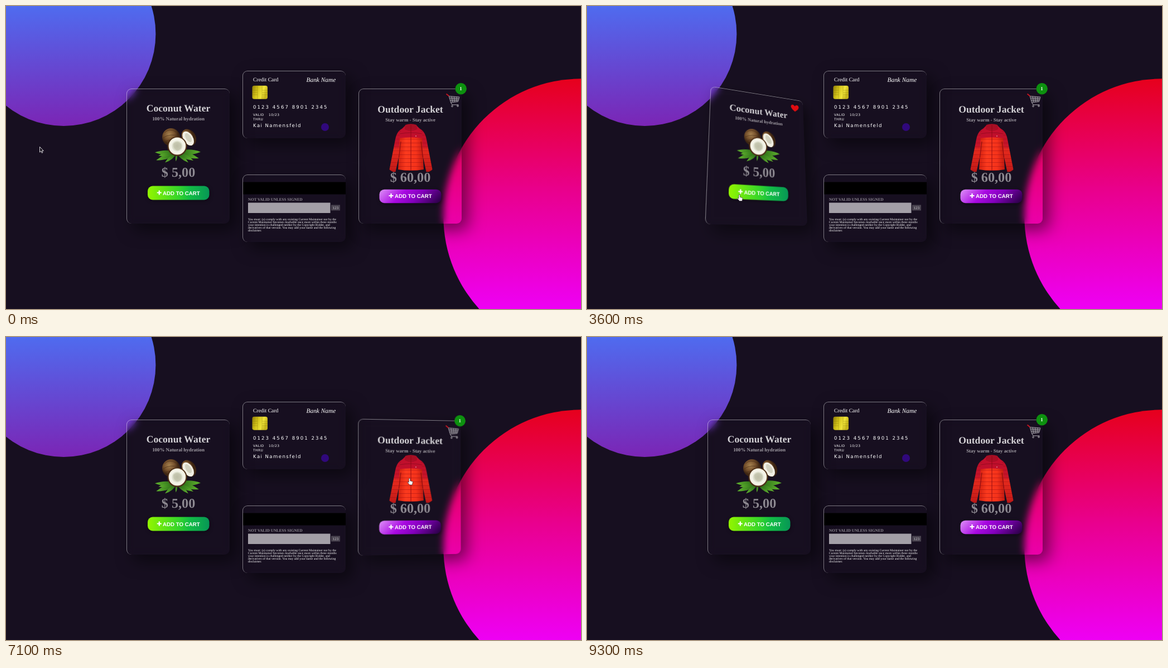
Recreate the animation shown at these times as an HTML page. Size 1031 px wide and 543 px high, loop 9.8 s.

```html
<!DOCTYPE html>
<html lang="en">
<head>
<meta charset="utf-8">
<title>Tilting shop cards</title>
<style>
  html, body { margin: 0; width: 100%; height: 100%; overflow: hidden; background: #170f20; }
  #stage { position: relative; width: 1031px; height: 543px; overflow: hidden; background: #170f20; }
  .disc { position: absolute; inset: 0; }
  .blue { clip-path: circle(165px at 103.4px 50px); background: linear-gradient(#4f6bef, #7b25b5 215px); }
  .pink { clip-path: circle(246.7px at 1031px 377px); background: linear-gradient(#e6001c 130px, #e9008f 335px, #ee00f4 543px); }
  .card {
    position: absolute; box-sizing: border-box; width: 185px; border-radius: 9px;
    border: 0 solid rgba(255, 255, 255, .44); border-width: 1px 0 0 1px;
    box-shadow: 11.5px 11.5px 29px rgba(0, 0, 0, .5); backdrop-filter: blur(6.5px);
  }
  .tall { top: 148px; height: 242px; }
  .flat { left: 424px; height: 121px; }
  .card svg { position: absolute; left: -1px; top: -1px; width: 185px; height: 100%; overflow: visible; }
  .tall svg { top: 0; }
  text { font-family: "Liberation Serif", "Times New Roman", serif; text-rendering: geometricPrecision; fill: #fff; }
  .mid { text-anchor: middle; }
  .title { font-size: 17.6px; font-weight: 700; fill: #d3d1d5; }
  .sub { font-size: 8.9px; font-weight: 700; fill: #a29ea5; }
  .price { font-size: 24.2px; font-weight: 700; fill: #8c8890; }
  .buy { font: 700 9.7px "Liberation Sans", Arial, sans-serif; }
  .btn { filter: drop-shadow(1px 2px 3px rgba(0, 0, 0, .4)); }
  .tech { font-family: "DejaVu Sans", sans-serif; font-size: 8.6px; letter-spacing: 1.4px; }
  .number { letter-spacing: 2.05px; }
  .label { font-size: 5.9px; letter-spacing: .5px; }
  .tiny { font-size: 5.64px; }
  #cursor { position: absolute; left: 0; top: 0; width: 20px; height: 20px; overflow: visible; }
</style>
</head>
<body>
<div id="stage">
  <div class="disc blue"></div>
  <div class="disc pink"></div>

  <div class="card tall" style="left:216px">
    <svg>
      <defs>
        <linearGradient id="lime"><stop stop-color="#93f600"/><stop offset=".5" stop-color="#35d52a"/><stop offset=".68" stop-color="#12bd45"/><stop offset="1" stop-color="#079756"/></linearGradient>
        <radialGradient id="husk" cx=".4" cy=".35"><stop stop-color="#a5814f"/><stop offset=".6" stop-color="#76512c"/><stop offset="1" stop-color="#3d2512"/></radialGradient>
        <radialGradient id="flesh"><stop stop-color="#bfc0aa"/><stop offset=".5" stop-color="#d6d8c4"/><stop offset=".72" stop-color="#f6f6ec"/><stop offset="1" stop-color="#f0ecdc"/></radialGradient>
        <linearGradient id="green"><stop stop-color="#1d5a12"/><stop offset="1" stop-color="#62b52f"/></linearGradient>
        <path id="leaf" d="M0 0Q17-9 39 0Q17 8 0 0" fill="url(#green)"/>
      </defs>
      <text class="title mid" x="93" y="40">Coconut Water</text>
      <text class="sub mid" x="93" y="56">100% Natural hydration</text>
      <g id="leaves"></g>
      <circle cx="80" cy="86" r="16" fill="url(#husk)"/>
      <path d="M68 78Q77 69 89 77M66 87Q78 79 94 84M69 94Q79 88 92 93" fill="none" stroke="#4b2f17" stroke-width=".7"/>
      <g transform="rotate(-32 111 87)">
        <ellipse cx="112" cy="87" rx="12" ry="16" fill="url(#husk)"/>
        <ellipse cx="110" cy="88" rx="8.5" ry="14" fill="#f1efe4"/>
        <ellipse cx="111" cy="87" rx="4.5" ry="9" fill="#d3d2c0"/>
      </g>
      <circle cx="91" cy="102.5" r="17.6" fill="#4c2e16"/>
      <circle cx="91" cy="102" r="15.4" fill="url(#flesh)"/>
      <path d="M84 98Q91 91 98 98Q101 107 92 110Q84 108 84 98" fill="#b9b9a2" opacity=".5"/>
      <text class="price mid" x="93" y="157">$ 5,00</text>
      <rect class="btn" x="38" y="173.5" width="110.5" height="25" rx="9" fill="url(#lime)"/>
      <path d="M58.8 181.5V189.5M54.8 185.5H62.8" stroke="#fff" stroke-width="2.2"/>
      <text class="buy" x="65" y="189.5">ADD TO CART</text>
      <path id="heart" d="M167 24Q155 16 160 11Q164 8.5 167 13Q170 8.5 174 11Q179 16 167 24Z" fill="#e00c10"/>
    </svg>
  </div>

  <div class="card flat" style="top:116px">
    <svg>
      <defs><linearGradient id="gold" x2="1" y2=".3"><stop stop-color="#8f7c08"/><stop offset=".4" stop-color="#d3c31a"/><stop offset=".75" stop-color="#efe43a"/><stop offset="1" stop-color="#c4b31a"/></linearGradient></defs>
      <text x="19" y="18.5" font-size="9.7">Credit Card</text>
      <text x="114.5" y="20" font-size="11.4" font-style="italic">Bank Name</text>
      <rect x="17.5" y="26.7" width="27.5" height="24" rx="3.5" fill="url(#gold)"/>
      <path d="M18 35H27V43H18M45 35H35V43H45M27 35V27.5M35 35V27.5M27 43V50.5M35 43V50.5M18 39H27M35 39H45" fill="none" stroke="#7d6c06" stroke-width=".6" opacity=".55"/>
      <text class="tech number" x="19" y="67.7">0123 4567 8901 2345</text>
      <text class="tech label" x="19" y="81.2">VALID</text>
      <text class="tech label" x="19" y="88.7">THRU</text>
      <text class="tech label" x="47" y="81.2">10/23</text>
      <text class="tech" x="19" y="100.7">Kai Namensfeld</text>
      <circle cx="148" cy="101" r="7" fill="#30087c"/>
    </svg>
  </div>

  <div class="card flat" style="top:301.5px">
    <svg>
      <rect x="1" y="13.5" width="184" height="22" fill="#000"/>
      <text x="10" y="47" font-size="7.14" font-weight="700" style="fill:#8f8b93">NOT VALID UNLESS SIGNED</text>
      <rect x="10" y="50.5" width="147.5" height="18.5" fill="#a39fa7"/>
      <rect x="159" y="54.5" width="16" height="10" fill="#49434f"/>
      <text class="mid" x="167" y="61.9" font-size="6.6" style="fill:#d6d4d8">123</text>
      <g id="terms"></g>
    </svg>
  </div>

  <div class="card tall" style="left:632px">
    <svg>
      <defs>
        <linearGradient id="violet" gradientUnits="userSpaceOnUse" x1="59" y1="158" x2="127" y2="226"><stop stop-color="#df94f9"/><stop offset=".36" stop-color="#a909e2"/><stop offset=".6" stop-color="#8400bd"/><stop offset="1" stop-color="#22003a"/></linearGradient>
        <linearGradient id="shell"><stop stop-color="#d3200f"/><stop offset=".3" stop-color="#fb3a1e"/><stop offset=".7" stop-color="#f5331b"/><stop offset="1" stop-color="#c01a10"/></linearGradient>
        <linearGradient id="arm" x2="0" y2="1"><stop stop-color="#b70e2a"/><stop offset=".4" stop-color="#c8142a"/><stop offset=".5" stop-color="#e52a1d"/><stop offset="1" stop-color="#c01a18"/></linearGradient>
        <pattern id="quilt" width="8" height="7" patternUnits="userSpaceOnUse"><path d="M0 5.5H8" stroke="#8c0712" stroke-width=".8" opacity=".5"/></pattern>
        <path id="cuff" d="M80 70Q69 74 66 90L55.5 144Q60 149 66.5 148L73 118L76 96Z"/>
        <path id="torso" d="M80 70H108L114 80L115 110L117 144Q94 148 71 144L73 110L74 80Z"/>
        <g id="sleeve"><use href="#cuff" fill="url(#arm)"/><use href="#cuff" fill="url(#quilt)"/></g>
      </defs>
      <text class="title mid" x="93" y="41.5">Outdoor Jacket</text>
      <text class="sub mid" x="93" y="58">Stay warm - Stay active</text>
      <use href="#sleeve"/>
      <use href="#sleeve" transform="translate(188 0) scale(-1 1)"/>
      <use href="#torso" fill="url(#shell)"/>
      <use href="#torso" fill="url(#quilt)"/>
      <path d="M84 65Q94 61 104 65L109 70Q114 74 114.5 88Q94 85 73.5 88Q74 74 79 70Z" fill="#c00f2c"/>
      <path d="M74 80Q94 76 114 80M83 71Q94 77 105 71" fill="none" stroke="#86091d" stroke-width=".7"/>
      <path d="M84 64Q94 60.5 104 64L105 70Q94 75 83 70Z" fill="#a70e24"/>
      <path d="M94 64V146" stroke="#8d0a14" stroke-width=".9"/>
      <path d="M76 94L72.5 122M112 94L115.500 122" stroke="#7d0812" stroke-width=".9"/>
      <circle cx="103" cy="84" r=".8" fill="#f6d9d9"/>
      <text class="price mid" x="93" y="166">$ 60,00</text>
      <rect class="btn" x="37.5" y="179.7" width="111" height="24.5" rx="9" fill="url(#violet)"/>
      <path d="M58.5 187V195M54.5 191H62.5" stroke="#fff" stroke-width="2.2"/>
      <text class="buy" x="65" y="195">ADD TO CART</text>
      <g fill="none" stroke="#b0adb4">
        <path d="M162 12.5L181 14L178.5 22.5L165.5 24ZM163 16L180.5 17.2M164 20L179.5 20M167 13L169 23.5M171.5 13.3L172.5 23M176 13.7V22.5" stroke-width=".8" fill="#8a878e55"/>
        <path d="M165.5 24L168 28H179.5"/>
        <circle cx="168" cy="30.5" r="1.3"/><circle cx="178" cy="30" r="1.3"/>
        <path d="M157.5 8.5L162.5 12.5" stroke="#d11420" stroke-width="1.7"/>
      </g>
      <circle cx="183.7" cy="-.7" r="10.2" fill="#0d900f"/>
      <text class="mid" x="183.5" y="2.3" font-size="8.8" font-weight="700">1</text>
    </svg>
  </div>

  <svg id="cursor">
    <path id="arrow" d="M.5 .3V10L2.8 8L4.3 11.3L5.9 10.6L4.4 7.4H7.3Z" fill="#15101a" stroke="#e8e6ea" stroke-width=".9"/>
    <path id="hand" d="M-1 1.2Q-1 0 .2 0T1.4 1.2V4.5L5.2 5.5Q6.3 5.9 6 7.2L5.1 11.6H.4L-3 7.6Q-3.7 6.2-2.4 6.1L-1 7.3Z" fill="#fff" stroke="#1c1622" stroke-width=".6"/>
  </svg>
</div>

<script>
const LOOP = 9800, STEP = 100, LAG = 100, FADE = 400, MAX_TILT = 25;
const $ = id => document.getElementById(id);
const clamp = (v, lo, hi) => Math.min(hi, Math.max(lo, v));
const easeOut = p => 1 - (1 - clamp(p, 0, 1)) ** 4;

// Pointer path: time, x, y
const path = [
  [0, 60, 252], [200, 60, 252], [700, 173, 321], [900, 222, 300], [1300, 285, 262],
  [1700, 245, 215], [2000, 246, 160], [2100, 268, 151], [2200, 307, 166], [2500, 355, 215],
  [2800, 270, 285], [3100, 203, 322], [3400, 217, 338], [3500, 230, 342], [3600, 273, 338],
  [3800, 214, 322], [4100, 93, 275], [4300, 71, 264], [4500, 62, 300], [4800, 170, 455],
  [5100, 390, 520], [5300, 461, 531], [5400, 482, 472], [5700, 500, 370], [6000, 498, 250],
  [6200, 488, 198], [6300, 488, 204], [6600, 600, 232], [6900, 690, 290], [7200, 740, 235],
  [7500, 655, 318], [7700, 661, 337], [7800, 687, 340], [8000, 680, 345], [8200, 520, 330],
  [8400, 340, 270], [8600, 230, 180], [9100, 88, 2]
];
const held = [800, 3300, 4200, 4400, 9200];

function pointer(t) {
  const i = path.findIndex(p => p[0] > t);
  if (i < 0) return path[path.length - 1].slice(1);
  const [t0, x0, y0] = path[i - 1], [t1, x1, y1] = path[i];
  const k = (t - t0) / (t1 - t0);
  return [x0 + (x1 - x0) * k, y0 + (y1 - y0) * k];
}

const cards = [...document.querySelectorAll('.card')].map(el => ({
  el, x: el.offsetLeft, y: el.offsetTop, w: el.offsetWidth, h: el.offsetHeight, visits: []
}));
const inside = (c, [x, y]) => x >= c.x && x <= c.x + c.w && y >= c.y && y <= c.y + c.h;

// Find when the pointer enters and leaves each card
for (const c of cards) {
  let over = false;
  for (let t = 0; t <= 9100; t += 10) {
    const now = inside(c, pointer(t));
    if (now && !over) c.visits.push([t, t]);
    if (now) c.visits[c.visits.length - 1][1] = t;
    over = now;
  }
}

function tilt(c, t) {
  let rx = 0, ry = 0;
  for (const [enter, leave] of c.visits) {
    if (t <= enter || t >= leave + FADE) continue;
    const [x, y] = pointer(clamp(t - LAG, enter, leave));
    const k = 2 * MAX_TILT * easeOut((t - enter) / FADE) * (1 - easeOut((t - leave) / FADE));
    rx += k * ((y - c.y) / c.h - .5);
    ry += k * (.5 - (x - c.x) / c.w);
  }
  return rx || ry ? `perspective(577px) rotateX(${rx}deg) rotateY(${ry}deg)` : 'none';
}

$('leaves').innerHTML = [[181, 1], [160, 1], [140, .7], [40, .7], [14, 1.05], [-2, 1.1], [95, .4], [171, .85], [25, .85]]
  .map(([a, s]) => `<use href="#leaf" transform="translate(90 114) rotate(${a}) scale(${s})"/>`).join('');

$('terms').innerHTML = [
  'You must: (a) comply with any existing Current Maintainer nor by the',
  'Current Maintainer becomes reachable once more within three months',
  'your intention is challenged neither by the Copyright Holder, and',
  'derivatives of that version. You may add your name and the following',
  'disclaimer.'
].map((s, i) => `<text class="tiny" x="10" y="${81.8 + i * 5.05}">${s}</text>`).join('');

function draw(now) {
  let t = Math.floor(now % LOOP / STEP) * STEP;
  if (held.includes(t)) t -= STEP;
  for (const c of cards) c.el.style.transform = tilt(c, t);
  $('heart').style.opacity = t < 3500 ? 0 : clamp(1 - (t - 4200) / 1400, 0, 1);

  const pos = pointer(t), over = cards.some(c => inside(c, pos));
  $('cursor').style.display = t > 9100 ? 'none' : 'block';
  $('cursor').style.transform = `translate(${pos[0]}px, ${pos[1]}px)`;
  $('arrow').style.display = over ? 'none' : '';
  $('hand').style.display = over ? '' : 'none';
}

const start = performance.now();
function frame() {
  draw(performance.now() - start);
  requestAnimationFrame(frame);
}
frame();
</script>
</body>
</html>
```
